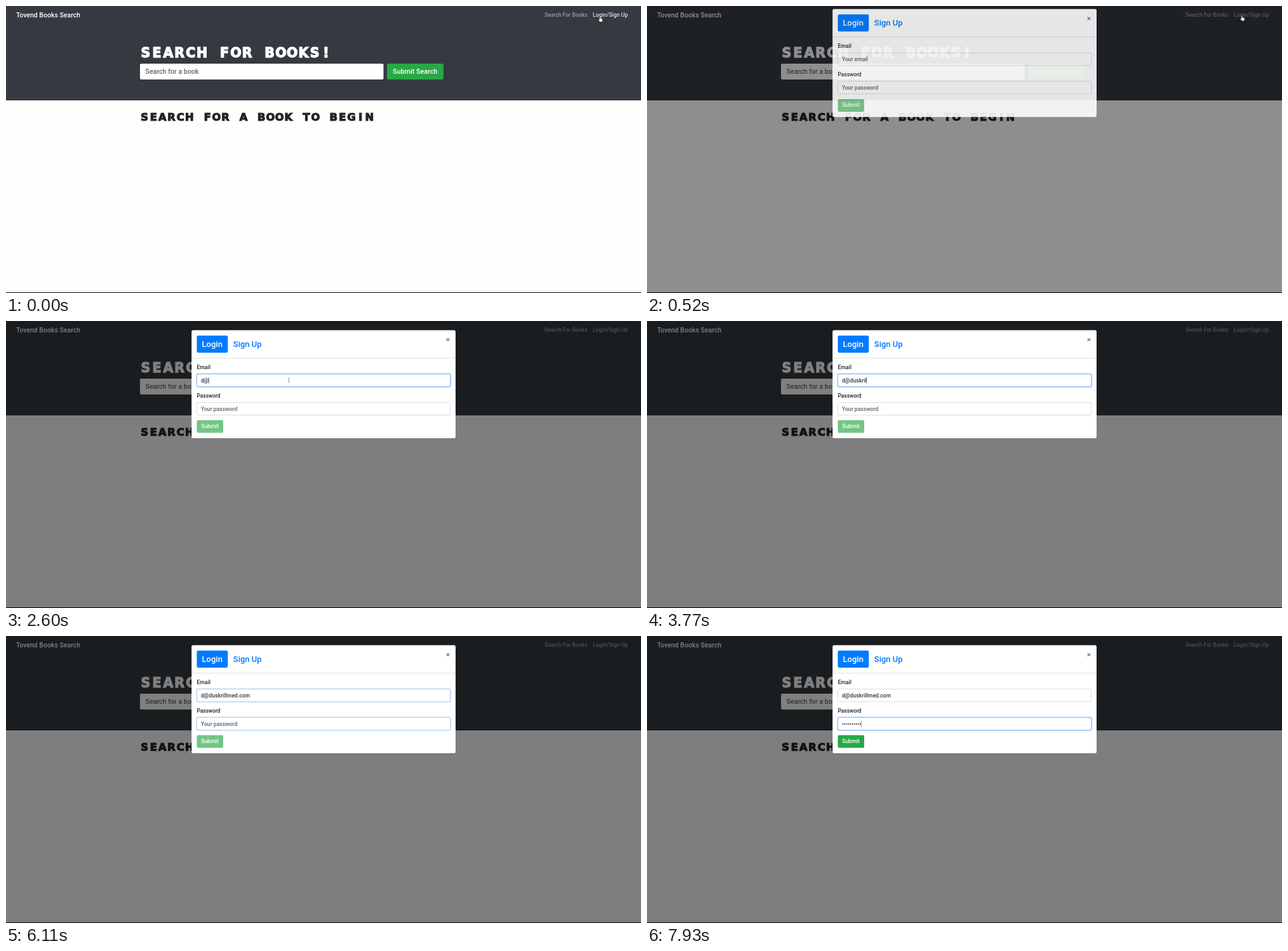
An HTML page that plays this animation: 1000x453 px, repeating every 8000 ms.

```html
<!DOCTYPE html>
<html lang="en">
<head>
<meta charset="utf-8">
<title>Book search login</title>
<style>
  html, body { margin: 0; width: 100%; height: 100%; overflow: hidden; background: #fefefe; }
  svg { display: block; width: 100vw; height: 100vh; font-family: Roboto, "Open Sans", sans-serif; font-weight: 500; }
  text { white-space: pre; }
  .small { font-size: 8.6px; }
  .mid { font-size: 10.65px; }
  .big { font-size: 13px; }
  .hint { fill: #5f666d; }
  .white { fill: #fff; }
  .nav { fill: #fff; fill-opacity: .5; }
  .heading { font: 700 20.5px "DejaVu Sans", Inter, sans-serif; text-anchor: middle; stroke-width: 1.4; }
  .heading.sub { font-size: 16.3px; stroke-width: 1.2; }
  .field { fill: #fff; stroke: #ced4da; stroke-width: .8; }
  .ring { fill: none; stroke: #007bff; stroke-opacity: .2; stroke-width: 1.8; }
  .edge { fill: none; stroke: #80bdff; stroke-width: .9; }
  .value { font-size: 8.65px; fill: #33383d; }
  .caret { fill: #555; }
</style>
</head>
<body>
<svg viewBox="0 0 1000 453" preserveAspectRatio="none">
  <rect width="1000" height="453" fill="#fefefe"/>
  <rect width="1000" height="149" fill="#343a40"/>
  <text x="16" y="18" class="white" font-size="10.5">Tovend Books Search</text>
  <text x="848" y="17" class="nav small">Search For Books</text>
  <text id="login" x="924" y="17" class="nav" font-size="8.75">Login/Sign Up</text>

  <text class="heading" y="80.5" data-x="211" data-pitch="17.75" fill="#fff" stroke="#fff">SEARCH FOR BOOKS!</text>
  <rect x="211" y="91" width="383.5" height="25" rx="2.2" fill="#fff"/>
  <text x="219.5" y="107.3" class="mid hint">Search for a book</text>
  <rect x="600" y="91" width="89" height="25" rx="2.2" fill="#28a745"/>
  <text x="609" y="107.3" class="white" font-size="10.8">Submit Search</text>
  <text class="heading sub" y="180.7" data-x="211" data-pitch="14.17" fill="#212529" stroke="#212529">SEARCH FOR A BOOK TO BEGIN</text>

  <rect id="backdrop" width="1000" height="453"/>

  <g id="modal">
    <rect x="292.2" y="14.5" width="415.8" height="170.5" rx="2.5" fill="#fff"/>
    <rect x="300.5" y="23" width="48.8" height="27" rx="2.2" fill="#007bff"/>
    <text x="308.5" y="41" class="big white">Login</text>
    <text x="357.8" y="41" class="big" fill="#007bff">Sign Up</text>
    <path d="M693.6 27.1l4.6 4.6m0-4.6l-4.6 4.6" stroke="#777" stroke-width="1.3"/>
    <path d="M292.5 58.5H707.7" stroke="#dee2e6"/>
    <text x="300.5" y="76" class="small" fill="#212529">Email</text>
    <g id="email"></g>
    <text x="300.5" y="121" font-size="8.4" fill="#212529">Password</text>
    <g id="password"></g>
    <rect id="submit" x="300.5" y="156.6" width="41.5" height="20" rx="1.8" fill="#28a745"/>
    <text x="307.2" y="169.2" class="white" font-size="8.7">Submit</text>
  </g>

  <rect y="452" width="1000" height="1"/>

  <g id="hand"><path d="M-1.4-4q1-1 1.6 0v2.6l2.6.7q.9.3.8 1.3l-.6 3.4h-4l-2.2-3.3q.3-.9 1.2-.4l.6.5z" fill="#fff" stroke="#222" stroke-width=".5"/></g>
  <g id="arrow"><path d="M0 0v8l1.9-1.8 1.3 2.9 1.3-.6-1.3-2.8h2.6z" fill="#111" stroke="#fff" stroke-width=".6"/></g>
  <g id="beam"><path d="M-1.4-3.6L0-3 1.4-3.6M0-3V3M-1.4 3.6L0 3 1.4 3.6" fill="none" stroke="#777" stroke-width=".7"/></g>
</svg>
<script>
const LOOP = 8000, STEP = 130;
const EMAIL = 'd@duskrillmed.com';
// Bursts of key presses: start time, number of keys, one key per step
const emailKeys = [[2340, 1], [2600, 1], [2860, 1], [3120, 6], [4030, 2], [4680, 1], [5070, 2], [5590, 3]];
const passwordKeys = [[6370, 1], [6630, 3], [7150, 4], [7800, 2]];
// Pointer path: time, x, y, shape
const pointer = [
  [0, 936, 21, 'hand'], [130, 937.5, 19.5, 'hand'], [650, 835, 52, 'arrow'], [780, 620, 118, 'beam'],
  [910, 483.5, 141.5, 'beam'], [1300, 458, 108, 'beam'], [1430, 445.5, 93.5, 'beam'], [2860, 0, 0, '']
];

const $ = id => document.getElementById(id);
const clamp = v => Math.min(1, Math.max(0, v));
const ramp = (t, start) => clamp((t - start + STEP) / (2 * STEP));
const typed = (keys, t) => keys.reduce((n, [start, count]) =>
  n + (t < start ? 0 : Math.min(count, (t - start) / STEP + 1 | 0)), 0);

// Headings sit on a fixed pitch, one centred letter per cell
for (const el of document.querySelectorAll('.heading')) {
  const { x, pitch } = el.dataset;
  el.setAttribute('x', [...el.textContent].map((_, i) => +x + pitch * (i + .5)).join(' '));
}

function makeField(id, y, hint) {
  const box = `x="300.5" y="${y}" width="399.4" height="20" rx="2"`;
  const group = $(id);
  group.innerHTML = `<rect class="field" ${box}/>
    <g><rect class="ring" x="299.9" y="${y - .6}" width="400.6" height="21.2" rx="2.6"/><rect class="edge" ${box}/></g>
    <text x="307" y="${y + 13.3}"></text><rect class="caret" y="${y + 5}" width=".7" height="10"/>`;
  const [, focus, text, caret] = group.children;
  return (value, focused) => {
    focus.setAttribute('opacity', focused);
    text.textContent = value || hint;
    text.setAttribute('class', value ? 'value' : 'small hint');
    caret.setAttribute('x', 306.6 + (value ? text.getComputedTextLength() : 0));
    caret.setAttribute('opacity', focused > .5 ? 1 : 0);
  };
}
const showEmail = makeField('email', 83.7, 'Your email');
const showPassword = makeField('password', 128.5, 'Your password');

function draw(t) {
  const open = t < 390 ? 0 : t < 520 ? .25 : t < 650 ? .89 : 1;
  const lift = t < 520 ? -22 : t < 650 ? -9.7 : 0;
  $('backdrop').setAttribute('opacity', open * .5);
  $('modal').setAttribute('opacity', open);
  $('modal').setAttribute('transform', `translate(0 ${lift})`);
  $('login').style.fillOpacity = t < 390 ? .85 : .5;

  const tab = ramp(t, 6110);
  const dots = typed(passwordKeys, t);
  showEmail(EMAIL.slice(0, typed(emailKeys, t)), tab ? 1 - tab : ramp(t, 1690));
  showPassword('•'.repeat(dots), tab);
  $('submit').setAttribute('opacity', dots ? 1 : .65);

  const [, x, y, shape] = pointer.filter(p => p[0] <= t).pop();
  for (const id of ['hand', 'arrow', 'beam']) {
    $(id).setAttribute('visibility', id === shape ? 'visible' : 'hidden');
    $(id).setAttribute('transform', `translate(${x} ${y})`);
  }
}

function tick() {
  draw(Math.floor(performance.now() % LOOP / STEP) * STEP);
  requestAnimationFrame(tick);
}
tick();
</script>
</body>
</html>
```
